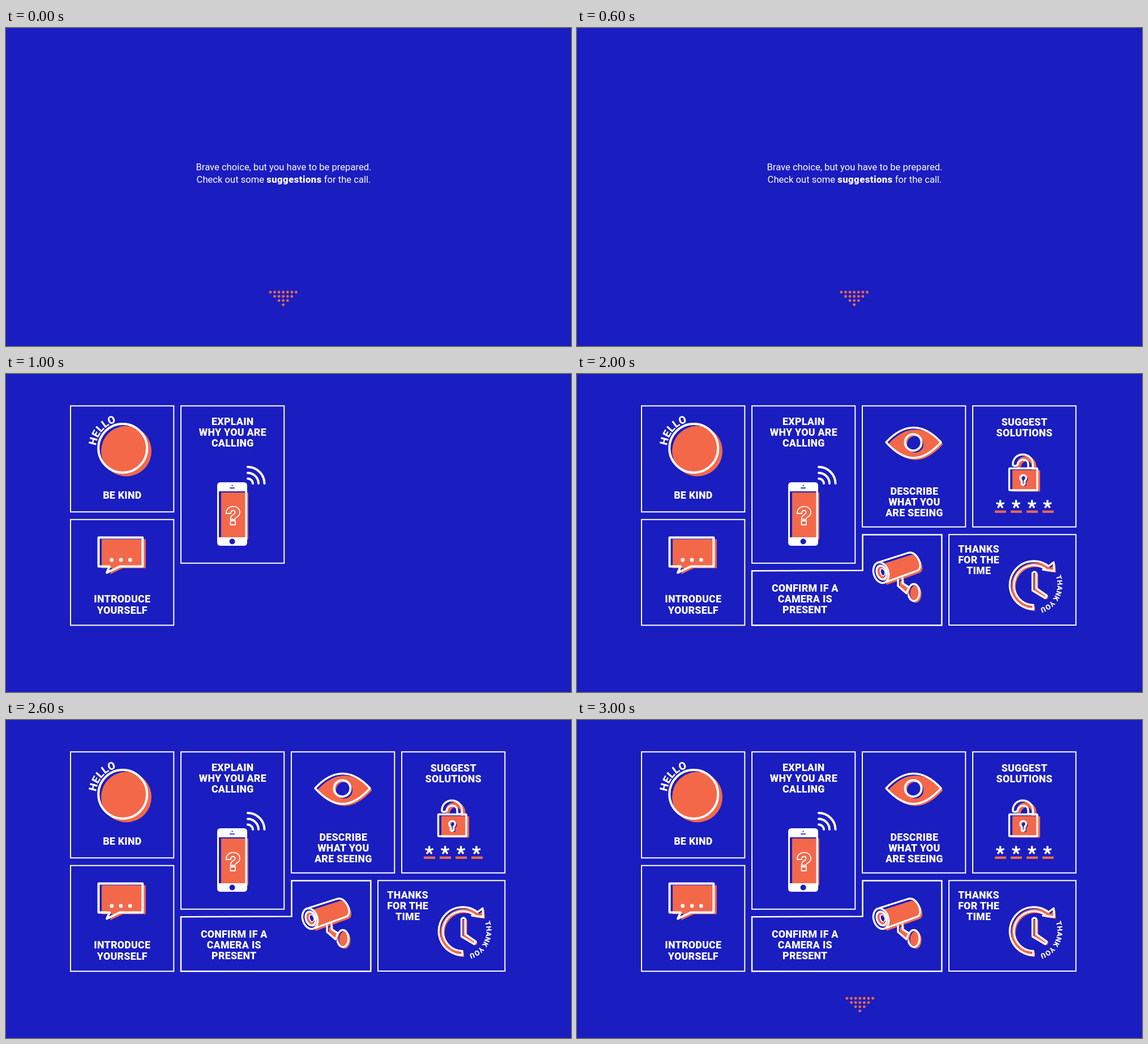
These frames come from a looping animation (998 by 561 pixels, 4 s). An HTML page:

```html
<!DOCTYPE html>
<html lang="en">
<head>
<meta charset="utf-8">
<title>Call suggestions</title>
<style>
html, body { margin: 0; width: 100%; height: 100%; overflow: hidden; background: #1a1dc0; }
svg { display: block; width: 100%; height: 100%; }
text { fill: #fff; font-family: Roboto, Inter, sans-serif; text-anchor: middle; }
.title { font-size: 17.8px; font-weight: 900; letter-spacing: .25px; }
.hello { font-size: 19px; }
.small { font-size: 12.7px; font-weight: 900; }
.body { font-size: 16.6px; font-weight: 400; }
.body tspan { font-weight: 900; letter-spacing: .5px; }
.box { fill: none; stroke: #fff; stroke-width: 2; }
.line { fill: none; stroke: #fff; stroke-width: 4; stroke-linejoin: round; stroke-linecap: round; }
.thin { stroke-width: 3.4; }
.fine { stroke-width: 1.8; }
.o { fill: #f4684a; }
.w { fill: #fff; }
.b { fill: #1a1dc0; }
</style>
</head>
<body>
<svg viewBox="0 0 998 561">
<defs>
  <path id="helloArc" d="M174.5 167.2A48 48 0 0 1 237.5 94.8"/>
  <path id="thanksArc" d="M825.6 334.3A42.5 42.5 0 0 1 788.4 410.7"/>
  <path id="bubble" d="M163.5 288.5H241.3V339.5H201L178 350.5L183 339.5H163.5Z"/>
  <path id="eye" d="M546 120.5C562 103 578 94.5 594.5 94.5S627 103 643 120.5C627 138 611 148 594.5 148S562 138 546 120.5Z"/>
  <path id="shackle" d="M770 161C769 150 777 142 787.5 142S805.5 150 805.5 160V166H797V160C797 154 793 151 788 151S779 155 778.5 160Q774 164 770 161Z"/>
  <path id="keyhole" d="M785.5 188A5.3 5.3 0 1 1 790.8 188V194.5Q788 197 785.5 194.5Z"/>
  <path id="barrel" d="M530 333L585 315.5C597 312 607 329 606 340Q605 345.5 601 347L543 368Z"/>
  <path id="stem" d="M567 363V374L582 387L586 376L575 369V360"/>
  <path id="turn" d="M806 415A42.5 42.5 0 1 1 833 339L842 332L843 347.5L823 345H828.5A35 35 0 1 0 806 407.5Z"/>
  <path id="hands" d="M804.5 351Q808 347 811.5 351V378L830 391L827 395.5L804.5 382Z"/>
  <path id="star" class="line thin" style="stroke-linecap:butt" d="M0 0V-7.5M0 0L7.1-2.3M0 0L-7.1-2.3M0 0L4.4 6.1M0 0L-4.4 6.1"/>
  <g id="arrow" class="o"></g>
</defs>

<g id="intro">
  <text class="body" x="490.5" y="250.5">Brave choice, but you have to be prepared.</text>
  <text class="body" x="490.5" y="273">Check out some <tspan>suggestions</tspan> for the call.</text>
  <use href="#arrow" x="489.7" y="466"/>
</g>

<g id="first">
  <path class="box" d="M114 56.3H296.3V243.3H114ZM114 256.8H296.3V443.3H114ZM309 56.3H491.3V333.7H309Z"/>

  <circle class="o" cx="212.5" cy="136" r="44.5"/>
  <circle class="line" cx="206.2" cy="131" r="43"/>
  <text class="title hello"><textPath href="#helloArc" startOffset="50%">HELLO</textPath></text>

  <use href="#bubble" class="o" x="5.5" y="3"/>
  <use href="#bubble" class="line"/>
  <g class="w"><circle cx="186.7" cy="328" r="3.4"/><circle cx="203" cy="328" r="3.4"/><circle cx="219.3" cy="328" r="3.4"/></g>

  <path class="o" d="M380 209H428V289Q428 293 424 293H380Z"/>
  <path class="w" fill-rule="evenodd" d="M379 191H420Q426 191 426 197V297Q426 303 420 303H379Q373 303 373 297V197Q373 191 379 191ZM376 207V288H422.5V207Z"/>
  <circle class="b" cx="399.6" cy="295.5" r="5"/>
  <circle class="b" cx="399.6" cy="196.7" r="1.1"/>
  <rect class="b" x="395" y="200.3" width="9" height="1.6" rx=".8"/>
  <path class="line fine" d="M388.8 246C388.8 230 413 229.5 413 244.5C413 253 404.5 251 404.5 256.5H396.5C396.5 247 404.5 249 404.5 244.5C404.5 239 397 239.5 397 246ZM396.5 259H405V266H396.5Z"/>
  <path class="line" d="M427 164A29.5 29.5 0 0 1 456.5 193M427 174.5A19 19 0 0 1 446 193M427 184.5A9 9 0 0 1 436 193"/>
</g>

<g id="second">
  <path class="box" d="M504 56.3H686.3V269.8H504ZM699 56.3H881.3V269.8H699ZM657 283.3H881.3V443H657Z"/>
  <path class="box" style="stroke-width:2.5" d="M309 347.3L504.5 346.5V283.5H644.3V443.3H309Z"/>

  <use href="#eye" class="o" x="3.5" y="3.5"/>
  <circle class="b" cx="597.5" cy="124" r="14.5"/>
  <use href="#eye" class="line thin"/>
  <circle class="line" cx="594" cy="120.7" r="14.5"/>

  <use href="#shackle" class="o" x="6" y="3"/>
  <rect class="o" x="769" y="169.5" width="49" height="38" rx="2"/>
  <use href="#keyhole" class="b" x="3" y="2"/>
  <use href="#shackle" class="line thin"/>
  <rect class="line thin" x="763.5" y="166.5" width="49.5" height="38.5" rx="1"/>
  <use href="#keyhole" class="line thin"/>
  <use href="#star" x="747.6" y="229.8"/><use href="#star" x="775.6" y="229.8"/>
  <use href="#star" x="803.6" y="229.8"/><use href="#star" x="831" y="229.8"/>
  <path class="o" d="M738 240.8H758V245H738ZM766 240.8H786V245H766ZM794 240.8H814V245H794ZM822 240.8H842V245H822Z"/>

  <use href="#barrel" class="o" x="4" y="4"/>
  <ellipse class="o" cx="598.5" cy="388" rx="10" ry="15.5"/>
  <use href="#barrel" class="line thin"/>
  <g transform="rotate(-18 537 350.5)">
    <ellipse class="b" cx="537" cy="350.5" rx="13" ry="18.5"/>
    <ellipse class="o" cx="540" cy="352" rx="9.5" ry="14"/>
    <ellipse class="b" cx="542" cy="351" rx="5" ry="8"/>
    <ellipse class="line thin" cx="537" cy="350.5" rx="13" ry="18.5"/>
    <ellipse class="line thin" cx="538" cy="350.5" rx="8.5" ry="12.5"/>
    <ellipse class="line fine" cx="540" cy="350.5" rx="4" ry="6.5"/>
  </g>
  <ellipse class="line thin" cx="595" cy="385.5" rx="10" ry="15"/>
  <use href="#stem" class="o" x="3" y="3"/>
  <use href="#stem" class="line thin"/>

  <use href="#turn" class="o" x="3" y="3"/>
  <use href="#turn" class="line thin"/>
  <use href="#hands" class="o" x="3" y="2"/>
  <use href="#hands" class="line thin"/>
  <text class="small"><textPath href="#thanksArc" startOffset="50%">THANK YOU</textPath></text>
</g>

<use id="last" href="#arrow" x="499.7" y="491"/>
</svg>
<script>
const NS = "http://www.w3.org/2000/svg";
const get = id => document.getElementById(id);

function add(parent, tag, attrs, text = "") {
  const el = document.createElementNS(NS, tag);
  for (const key in attrs) el.setAttribute(key, attrs[key]);
  el.textContent = text;
  get(parent).append(el);
}

function title(parent, x, y, ...lines) {
  lines.forEach((line, i) => add(parent, "text", { class: "title", x, y: y + i * 19.2 }, line));
}

title("first", 205.3, 220.3, "BE KIND");
title("first", 205.3, 403.3, "INTRODUCE", "YOURSELF");
title("first", 400.3, 90, "EXPLAIN", "WHY YOU ARE", "CALLING");
title("second", 595.8, 213, "DESCRIBE", "WHAT YOU", "ARE SEEING");
title("second", 790.3, 91, "SUGGEST", "SOLUTIONS");
title("second", 402.8, 384, "CONFIRM IF A", "CAMERA IS", "PRESENT");
title("second", 709.6, 315, "THANKS", "FOR THE", "TIME");

for (let row = 0; row < 4; row++)
  for (let col = row - 3; col <= 3 - row; col++)
    add("arrow", "circle", { cx: col * 7.6, cy: row * 7.4, r: 2.4 });

const show = (id, on) => get(id).style.display = on ? "" : "none";

function draw() {
  const step = Math.floor(performance.now() % 4000 / 1000);
  show("intro", step === 0);
  show("first", step >= 1);
  show("second", step >= 2);
  show("last", step === 3);
  requestAnimationFrame(draw);
}
draw();
</script>
</body>
</html>
```
